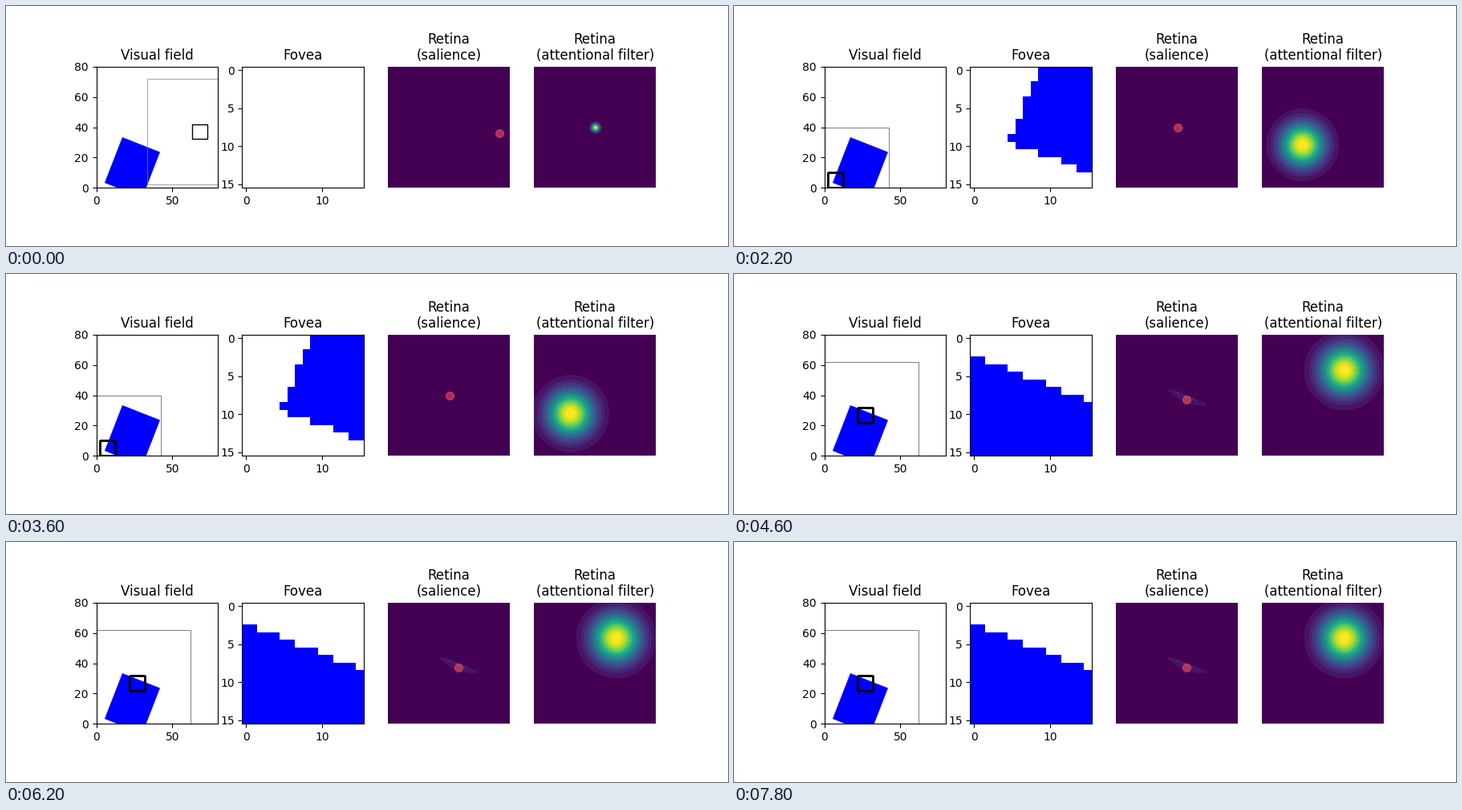
These frames come from a looping animation (900 px wide and 300 px high, 8000 ms). A matplotlib script:

```python
import numpy as np
import matplotlib.pyplot as plt
from matplotlib.animation import FuncAnimation
from matplotlib.colors import ListedColormap
from matplotlib.patches import Polygon, Rectangle
from matplotlib.path import Path

FRAMES, STEP = 40, 200
FIELD, FOVEA = 80, 16
RETINA_BOX, FOVEA_BOX = 70, 10
MOVE = FIELD / RETINA_BOX
OVERLAYS = 12

# Blue rectangle: one corner and its two sides
CORNER = np.array([5.5, 3.3])
LONG = np.array([11.65, 30.1])
SHORT = np.array([24.8, -9.8])
QUAD = np.array([CORNER, CORNER + LONG, CORNER + LONG + SHORT, CORNER + SHORT])
SHAPE = Path(QUAD)

# Gaze positions: search, first pass, then a repeating scan of eight steps
REST = (4.2, 3.3)
START = (39.8, 40.1)
SEARCH = [(68.3, 37.1), (47, 54), (34, 38), (27.2, 15.5)]
FIRST = [(18, 29.3), (18.8, 32.5), (20.5, 33), (22, 32),
         (12.5, 22), (8, 12), REST, REST]
SCAN = [(12.8, 21.9), (18, 29.5), (21.8, 28.7), (27, 26.65),
        (8.9, 17.8), REST, REST, REST]
GAZE = np.array([START] + SEARCH + FIRST + (SCAN * 4)[:28], float)
GAZE_MIN = (7.5, 4.93)

# Attention filter: centre x, centre y, sigma in retina cells
IDLE = (40.5, 40.5, 1.75)
FIRST_UP, FIRST_DOWN = (38.8, 15.5, 11.2), (26.7, 51.9, 9.75)
UP, DOWN = (54.1, 23.9, 10.75), (24.1, 52.4, 10.35)


def attention(i):
    if i < 4:
        spec = IDLE
    else:
        upper = (i - 4) % 8 < 4
        if i < 12:
            spec = FIRST_UP if upper else FIRST_DOWN
        else:
            spec = UP if upper else DOWN
    cx, cy, s = spec
    x, y = np.meshgrid(np.arange(FIELD) + 0.5, np.arange(FIELD) + 0.5)
    return np.exp(-((x - cx) ** 2 + (y - cy) ** 2) / (2 * s * s))


def view(gaze, n):
    """World points seen by an n x n sensor, one cell per unit."""
    k = np.arange(n) + 0.5 - n / 2
    x, y = np.meshgrid(gaze[0] + k + 0.75, gaze[1] - k + 0.39)
    return np.column_stack([x.ravel(), y.ravel()])


def salience(gaze):
    pts = view(gaze, FIELD)
    u, v = np.linalg.solve(np.column_stack([LONG, SHORT]), (pts - CORNER).T)
    depth = np.minimum(np.minimum(u, 1 - u) * np.hypot(*LONG),
                       np.minimum(v, 1 - v) * np.hypot(*SHORT))
    level = 0.42 + 0.2 * np.exp(-np.maximum(depth, 0) / 2.5)
    return np.where(depth > 0, level, 0).reshape(FIELD, FIELD)


fig, (field, fovea, sal, att) = plt.subplots(1, 4, figsize=(9, 3), dpi=100)

field.set(title="Visual field", xlim=(0, FIELD), ylim=(0, FIELD),
          xticks=[0, 50], yticks=range(0, 81, 20), aspect="equal")
field.add_patch(Polygon(QUAD, color="blue", lw=0))


def add_boxes(size, **style):
    return [field.add_patch(Rectangle((0, 0), size, size, fill=False, **style))
            for _ in range(OVERLAYS)]


retina_boxes = add_boxes(RETINA_BOX, ec="gray", lw=0.5)
fovea_boxes = add_boxes(FOVEA_BOX, ec="black", lw=1)

fovea.set_title("Fovea")
fovea_img = fovea.imshow(np.zeros((FOVEA, FOVEA)), vmin=0, vmax=1,
                         cmap=ListedColormap(["white", "blue"]),
                         interpolation="nearest")
fovea.set(xticks=[0, 10], yticks=[0, 5, 10, 15])


def retina_panel(ax, title):
    ax.set_title(title)
    ax.axis("off")
    return ax.imshow(np.zeros((FIELD, FIELD)), vmin=0, vmax=1,
                     cmap=plt.get_cmap("viridis", 20),
                     extent=(0, FIELD, FIELD, 0))


sal_img = retina_panel(sal, "Retina\n(salience)")
att_img = retina_panel(att, "Retina\n(attentional filter)")
dot, = sal.plot([], [], "o", ms=7, color=(1, 0.32, 0.34), alpha=0.55)
sal.set(xlim=(0, FIELD), ylim=(FIELD, 0))


def place(boxes, size, centre, count):
    for k, box in enumerate(boxes):
        box.set_xy(centre - size / 2)
        box.set_visible(k < count)


def update(i):
    before, now = GAZE[i], GAZE[i + 1]
    centre = np.maximum(now, GAZE_MIN)
    # Outlines pile up with every step, so they darken over time
    place(retina_boxes, RETINA_BOX, centre, i + 1)
    place(fovea_boxes, FOVEA_BOX, centre, i + 1)
    seen = SHAPE.contains_points(view(centre, FOVEA))
    fovea_img.set_data(seen.reshape(FOVEA, FOVEA).astype(float))
    focus = attention(i)
    att_img.set_data(focus)
    sal_img.set_data(salience(before) * focus)
    dx, dy = (now - before) * MOVE
    dot.set_data([FIELD / 2 + 0.3 + dx], [FIELD / 2 + 0.3 - dy])
    return [fovea_img, att_img, sal_img, dot, *retina_boxes, *fovea_boxes]


anim = FuncAnimation(fig, update, frames=FRAMES, interval=STEP,
                     init_func=lambda: update(0), repeat=True, repeat_delay=0)
plt.show()
```
